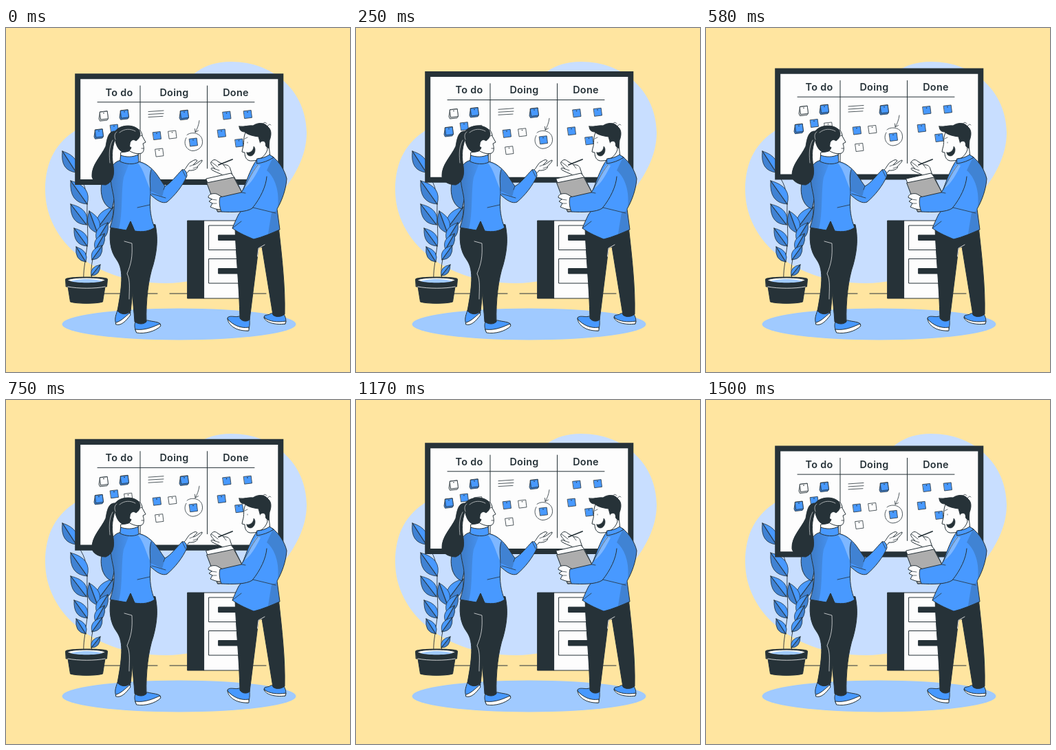
Write an HTML page that moves like this. It is 500 by 500 pixels and loops after 1.54 s.

```html
<!DOCTYPE html>
<html lang="en">
<head>
<meta charset="utf-8">
<title>Task board</title>
<style>
  html, body { margin: 0; height: 100%; overflow: hidden; background: #ffe5a0; }
  svg { display: block; width: 100%; height: 100%; }
  .ink { stroke: #263238; stroke-linejoin: round; stroke-linecap: round; }
  .dark { fill: #263238; }
  .white { fill: #fdfdfd; }
  .blue { fill: #4899ff; }
  .shade { fill: #263238; fill-opacity: .22; stroke: none; }
  .glow { fill: #fff; fill-opacity: .3; stroke: none; }
  .line { fill: none; }
  .thin { stroke-width: .7; }
  .seam { fill: none; stroke: #fdfdfd; }
  text { font: 600 14.4px Montserrat, Inter, sans-serif; letter-spacing: .3px; text-anchor: middle; stroke: none; }
</style>
</head>
<body>
<svg viewBox="0 0 500 500">
  <defs>
    <linearGradient id="fade">
      <stop stop-color="#263238" stop-opacity=".3"/>
      <stop offset="1" stop-color="#263238" stop-opacity=".08"/>
    </linearGradient>
    <g id="note">
      <path d="M0 1.2L10.7 0L12 10.7L1.5 12Z"/>
      <circle class="dark" stroke="none" cx="5.5" cy="2.7" r=".8"/>
    </g>
    <g id="pad">
      <path d="M1 1.2L-.5 11L1 14.2L11.5 13L13 10.7L11.700 0Z"/>
      <path class="shade" d="M1 1.2L-.5 11L1 14.2L11.5 13L13 10.7Z"/>
      <use href="#note" x="1"/>
    </g>
  </defs>

  <path fill="#c8deff" d="M327 49C392 49 436.500 95 437 152C437 187 419 216 401 239C381 268 366 285 350 311C329 346 290 371 232 371C130 371 57 311 57 235C57 192 75 165 101 149C150 125 215 140 245 100C265 70 285 49 327 49Z"/>
  <ellipse cx="251.5" cy="430.5" rx="170" ry="23" fill="#a0caff"/>

  <g class="ink">
    <path class="line" d="M143 386H220M238 386H378"/>

    <g id="plant">
      <path class="line" stroke-width=".9" d="M101 209C114 223 118 238 118 256C117 285 121 300 117 324C115 342 112 353 113 367M151 262C134 275 134 292 132 310C129 330 121 342 125 367"/>
    </g>
    <path class="dark" d="M86.500 365C86 361 147.500 361 147.500 365L146.500 376H144L140.500 398C132 401 102 401 93.500 398L90 376H87.500Z"/>
    <ellipse class="white" cx="117" cy="366.500" rx="27" ry="3.500"/>
    <path fill="#a0caff" stroke="none" d="M94 368C104 364 130 364 140 368C130 371 104 371 94 368Z"/>
    <path class="seam" stroke-width=".8" d="M90 376C105 379 130 379 144 376"/>

    <path class="dark" d="M264 280H288V393H264Z"/>
    <path class="white" d="M288 280H342V393H288Z"/>
    <g id="drawer">
      <path class="white" d="M295 287H342V322.500H295Z"/>
      <path class="dark" d="M309 301H342V308.500H309Z"/>
    </g>
    <use href="#drawer" y="48.500"/>

    <g id="board">
      <path class="dark" stroke="none" d="M100.200 66.600H403.300V228.500H100.200Z"/>
      <path class="white" stroke="none" d="M108.200 74.700H395.300V220.400H108.200Z"/>
      <path class="line" d="M133 108.200H361M195 84.500V205M292.500 84.500V204.500"/>
      <g class="dark">
        <text x="164.500" y="99">To do</text>
        <text x="244.500" y="99">Doing</text>
        <text x="334" y="99">Done</text>
      </g>
      <path class="line" stroke-width=".8" d="M207 122L229 120.500M207 126L229 124.700M207 130L228 128.800M281 135C280 142 278 147 275 152M274.500 147L275 152L279.500 149.500M263 156C268 151 282 152 285 162C288 173 279 179 271 179C262 178 257 168 262 160"/>
    </g>

    <g id="woman">
      <path class="blue" d="M145 216C137 224 137 236 140 247C143 256 148 261 154 263L163 225Z"/>
      <path class="shade" d="M145 216C137 224 137 236 140 247C143 256 148 261 154 263L163 225Z"/>
      <path class="blue" d="M163 408C160 416 157 423 160 430C165 433 171 428 175 421L181 414Z"/>
      <path class="white" d="M160 428C166 427 173 420 180 414L181 417C174 426 168 433 160 431Z"/>
      <path class="blue" d="M188 427C186 432 187 438 190 442C202 444 217 438 225 431C223 427 214 427 206 425Z"/>
      <path class="white" d="M188 438C203 440 214 434 224 430L225 433C217 441 202 445 190 443Z"/>
      <path class="dark" d="M153 286C149 305 151 324 161 337C172 352 168 378 162 411C167 417 175 417 181 412L184 384C184 397 186 411 187 427C193 431 200 431 204 427C203 397 207 364 214 344C220 322 221 304 217 286Z"/>
      <path class="seam thin" d="M172 310L183 313C184 333 182 342 176 357C181 367 179 380 179 394"/>
      <path class="white" d="M257 208C263 204 264 196 270 194C274 191 277 191 278 193L272 199C276 199 281 193 285 192C286 194 280 199 278 202C280 203 274 208 266 207C264 210 262 212 260 213Z"/>
      <path class="line thin" d="M272 199L267 201M278 202L272 204"/>
      <path class="blue" d="M167 192C159 194 153 199 152 209C151 229 157 240 157 252C158 269 154 281 151 290L175 294L181 281L187 295C199 297 209 295 216 290C211 278 208 264 210 242C218 250 227 256 234 253C246 243 257 229 263 215C263 208 259 205 256 206C248 214 239 226 231 230C225 222 218 209 210 203C203 197 198 195 191 194Z"/>
      <path fill="url(#fade)" stroke="none" d="M167 192C159 194 153 199 152 209C151 229 157 240 157 252C158 269 154 281 151 290L164 292C170 268 167 238 171 217L179 197Z"/>
      <path class="glow" d="M191 195C198 196 205 200 211 205C207 213 209 224 210 235C204 224 201 207 191 195Z"/>
      <path class="shade" d="M211 205C219 212 225 222 231 230L227 245L210 237C208 224 207 214 211 205Z"/>
      <path class="line" stroke-width=".8" d="M211 206C208 216 210 230 210 242M212 241L232 247M191 261L209 257M231 230L229 235M256 206L261 216"/>
      <path class="dark" d="M175 294L181 281L187 295Z"/>
      <path class="white" d="M167 181L193 176L192 191C184 196 174 194 167 191Z"/>
      <path class="blue" d="M167 185C174 188 185 188 192 184L193 195C185 199 174 198 166 194Z"/>
      <path class="white" d="M186 147C194 145 198 151 198 157L203 166L199 168C201 174 201 180 197 182C189 184 181 181 174 174L173 155Z"/>
      <path class="line" stroke-width=".8" d="M195 157L198 156M197 175L200 175"/>
      <path class="dark" d="M158 151C164 141 183 139 192 147C198 153 194 161 189 164C184 160 180 164 182 170C183 178 177 181 169 180C162 177 157 165 158 151Z"/>
      <path class="white" stroke="none" d="M181 166C183 162 188 165 187 170C186 174 182 174 180 172"/>
      <path class="dark" d="M159 150C149 149 147 160 145 172C138 187 124 199 125 216C126 223 135 228 145 228C155 224 158 214 156 201C154 189 153 178 159 160Z"/>
      <path class="seam" stroke-width=".6" d="M161 151C158 153 157 157 159 162M155 163C149 174 150 186 151 196M165 152C172 146 181 146 188 150"/>
    </g>

    <g id="man">
      <path class="blue" d="M339 419C333 421 326 417 322 421C323 431 336 439 352 440C355 433 354 426 354 422Z"/>
      <path class="white" d="M322 423C330 432 341 437 353 435L353 440C337 441 324 434 322 423Z"/>
      <path class="blue" d="M385 415C382 418 377 416 375 419C378 427 393 431 406 430C408 424 406 420 404 416Z"/>
      <path class="white" d="M375 421C383 427 395 428 407 426L406 430C391 432 377 428 375 421Z"/>
      <path class="dark" d="M333 291C334 328 339 375 340 422C344 427 350 427 354 424L367 320L372 318L388 417C393 421 400 420 405 416C406 377 401 332 396 288Z"/>
      <path class="seam" stroke-width=".8" d="M365.500 332L367 320L376 315"/>
      <path class="white" d="M362 175L382 170L384 188L365 196Z"/>
      <path class="white" d="M348 152C344 161 347 167 344 175L343 180L347 181C347 188 350 194 358 193C367 193 376 188 380 177L377 151Z"/>
      <path class="dark" stroke-width=".6" d="M350 181C356 182 360 177 360 172C364 175 362 185 356 186C352 186 350 184 350 181Z"/>
      <path class="line thin" d="M347 161L351 159M351 166V167"/>
      <path class="dark" d="M339 143C347 144 353 141 359 142C366 137 376 137 381 144C387 149 385 158 383 163L382 175L378 172L375 164L370 169L367 158C359 157 351 155 347 151C342 151 339 148 339 143Z"/>
      <path class="line" stroke-width=".8" d="M373 140C375 136 377 137 379 139M380 143C382 139 384 140 385 141"/>
      <path class="white" stroke="none" d="M369 168C371 163 377 164 377 169C377 173 372 174 370 172"/>

      <path class="white" d="M298 195C301 190 305 191 308 194L317 199C322 198 326 202 326 205L331 219L321 221C316 211 308 212 299 206C296 203 301 203 304 205C301 201 296 197 298 195Z"/>
      <path class="line" stroke-width=".8" d="M299 195L308 202M304 205L310 207M316 199L320 204"/>
      <path stroke-width="1.800" class="line" d="M309 199L329 191"/>

      <path class="blue" d="M366 190C358 198 351 218 343 239L330 250L344 263L338 271C334 279 331 286 329 291C340 299 351 303 360 307C373 304 386 298 398 293L394 263C401 251 407 235 408 219C405 206 397 195 388 187Z"/>
      <path class="shade" d="M388 188C397 196 405 207 408 219C406 236 401 249 395 261C398 238 391 217 379 207Z"/>
      <path class="shade" d="M398 293L394 265L386 268L381 299Z"/>
      <path class="white" d="M291 219L327 211L332 217L344 241L341 265L308 267Z"/>
      <path fill="#adadad" d="M292 225L331 217L344 241L341 265L308 267Z"/>
      <path class="white" d="M294 246C294 241 301 240 306 241L315 246V263C307 265 302 262 297 260L300 255L295 252L299 249Z"/>
      <path class="line thin" d="M299 249L306 250M300 255L306 255"/>
      <path class="blue" d="M366 199C356 211 350 227 342 239L311 246C309 253 311 262 313 267C329 268 349 268 358 262C370 247 378 230 379 216"/>
      <path class="glow" d="M365 198C357 207 352 222 346 233C356 227 363 214 370 200Z"/>
      <path class="line" stroke-width=".8" d="M342 239L348 240M359 261L392 269M342 281L329 291"/>
      <path class="blue" d="M365 190C371 190 379 187 383 184L389 188C382 193 373 196 365 197Z"/>
    </g>
  </g>
</svg>
<script>
  const LOOP = 1540, STEPS = 37, LIFT = 10, LEAD = 35;
  const board = document.getElementById("board");
  const plant = document.getElementById("plant");

  const add = (parent, markup) => parent.insertAdjacentHTML("beforeend", markup);
  const sticky = (shape, color, x, y) =>
    add(board, `<use href="#${shape}" class="${color}" stroke-width=".8" x="${x}" y="${y}"/>`);
  // A leaf grows from its base on the stem to its tip.
  const leaf = (x, y, tipX, tipY) => {
    const length = Math.hypot(tipX - x, tipY - y), width = length * .5;
    const angle = Math.atan2(tipY - y, tipX - x) * 180 / Math.PI;
    const half = side => `M0 0Q${length * .4} ${side * width} ${length} 0Z`;
    add(plant, `<g transform="translate(${x} ${y}) rotate(${angle})" stroke-width=".7">
      <path class="blue" d="${half(1)}${half(-1)}"/>
      <path class="shade" d="${half(tipX < x ? -1 : 1)}"/></g>`);
  };

  [["pad", "white", 135.5, 121.5], ["pad", "blue", 165.5, 119.5], ["pad", "blue", 128.5, 147.5],
   ["note", "blue", 151.5, 140.5], ["note", "white", 172, 145], ["pad", "blue", 252.5, 120],
   ["note", "blue", 213.5, 151], ["note", "white", 236, 149.5], ["note", "white", 217, 175.5],
   ["note", "blue", 266.5, 160.5], ["note", "blue", 315, 121.5], ["note", "blue", 345.5, 120],
   ["note", "blue", 307.5, 147.5], ["note", "blue", 333, 161.5]
  ].forEach(n => sticky(...n));

  [[102, 210, 82, 179], [118, 256, 94, 222], [117, 286, 94, 256], [118, 317, 99, 291],
   [116, 340, 102, 318], [133, 291, 156, 260], [133, 298, 121, 266], [132, 309, 148, 283],
   [130, 322, 143, 299], [125, 337, 140, 316], [124, 360, 137, 344]
  ].forEach(l => leaf(...l));

  function draw(now) {
    const step = Math.floor(now % LOOP / LOOP * STEPS + .1) % STEPS;
    const phase = (step / STEPS + LEAD / LOOP) % 1;
    const y = -LIFT * (1 - Math.abs(2 * phase - 1));
    board.setAttribute("transform", `translate(0 ${y.toFixed(3)})`);
    requestAnimationFrame(draw);
  }
  draw(performance.now());
</script>
</body>
</html>
```
